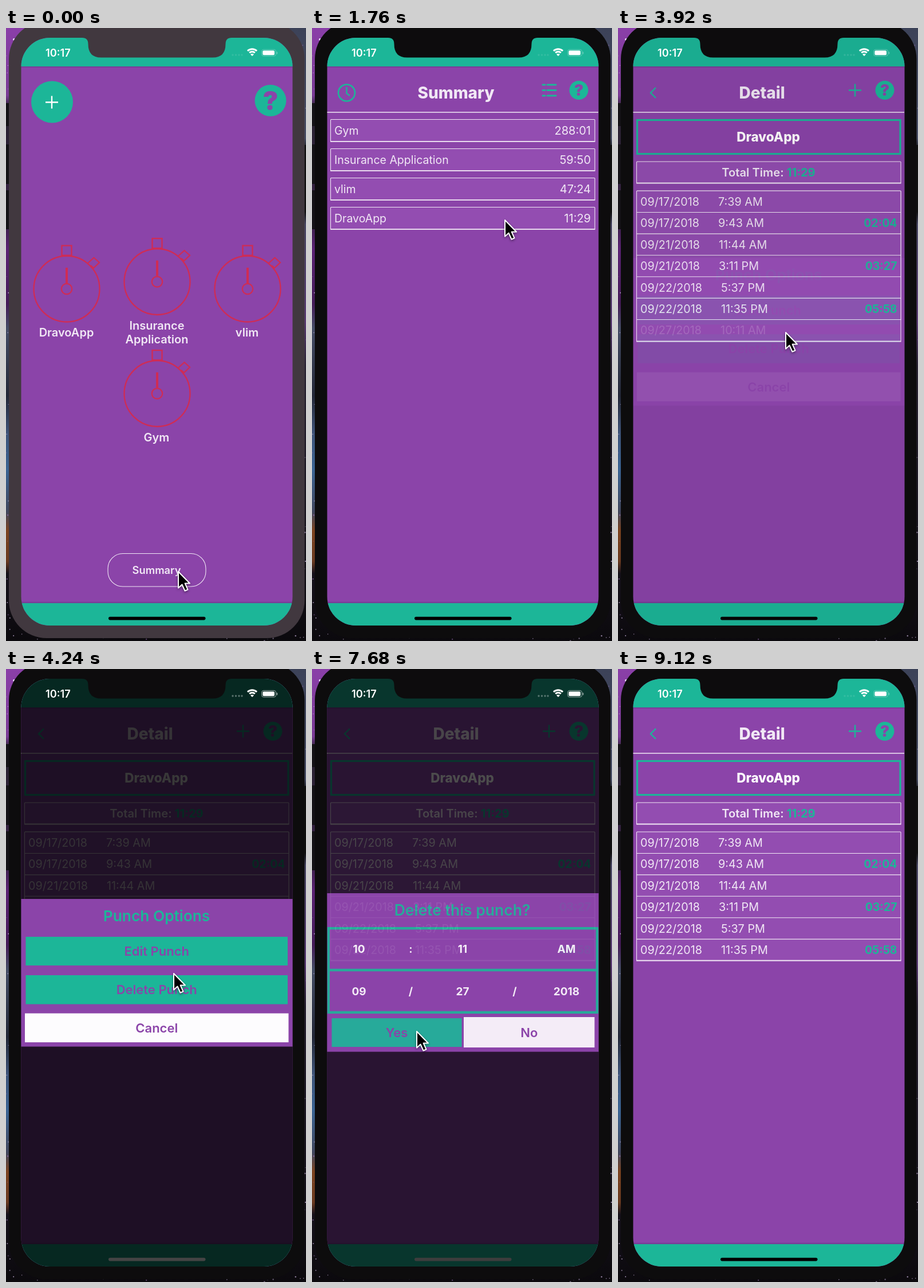
Write an HTML page that moves like this. It is 524x1069 px and loops after 9200 ms.

```html
<!DOCTYPE html>
<html lang="en">
<head>
<meta charset="utf-8">
<title>Time tracker</title>
<style>
  html, body { margin: 0; width: 100%; height: 100%; overflow: hidden; background: #0d0b11; }
  svg { display: block; width: 524px; height: 1069px; }
  text { font-family: Inter, "Open Sans", sans-serif; white-space: pre; }
</style>
</head>
<body>
<svg id="stage" viewBox="0 0 524 1069" xmlns="http://www.w3.org/2000/svg"></svg>
<script>
const LOOP = 9200, STEP = 80;
const PURPLE = '#8b44a9', TEAL = '#1cb698', RED = '#cf2c55', LIGHT = '#f1e8f5';
const TASK = 'DravoApp', SIDE = 'vlim';

// Drawing helpers
const rect = (x, y, x2, y2, fill, more = '') =>
  `<rect x="${x}" y="${y}" width="${x2 - x}" height="${y2 - y}" fill="${fill}" ${more}/>`;
const circle = (x, y, r, fill, more = '') =>
  `<circle cx="${x}" cy="${y}" r="${r}" fill="${fill}" ${more}/>`;
const line = (d, color, width, more = '') =>
  `<path d="${d}" fill="none" stroke="${color}" stroke-width="${width}" ${more}/>`;
const text = (str, x, y, size, weight, fill = LIGHT, anchor = 'middle') =>
  `<text x="${x}" y="${y + size * 0.364}" font-size="${size}" font-weight="${weight}" fill="${fill}" text-anchor="${anchor}">${str}</text>`;
const group = (id, body, more = '') => `<g id="${id}" ${more}>${body}</g>`;
const card = (y, y2) =>
  rect(32.5, y, 494, y2, '#934db1', `stroke="${LIGHT}" stroke-width="1.1" rx="1"`) +
  line(`M32 ${y2}H494.5`, LIGHT, 1.8);
const help = (x, y, r, size) => circle(x, y, r, TEAL) + text('?', x, y, size, 900, PURPLE);
const plus = (x, y, r, color) => line(`M${x - r} ${y}h${2 * r}M${x} ${y - r}v${2 * r}`, color, 2.4);
const header = title =>
  text(title, 251.5, 113, 28, 800, LIGHT) + help(466, 108.5, 16.5, 27) +
  line('M26 147H500', LIGHT, 1.3);

function wallpaper() {
  const bands = [
    [0, '#8a3fa8'], [0.11, '#7a3a95'], [0.13, '#27222e'], [0.32, '#3a2148'], [0.36, '#5b2274'],
    [0.45, '#451b58'], [0.49, '#454d66'], [0.6, '#232737'], [0.66, '#3e5378'], [0.72, '#3a6494'],
    [0.79, '#41465c'], [0.82, '#7c431f'], [0.87, '#6a3a20'], [0.89, '#15111a'], [1, '#0b090d']];
  const rightBands = [[0, '#3c4258'], [0.18, '#4a5068'], [0.2, '#111'], [0.3, '#111'],
    [0.32, '#4b4a66'], [0.48, '#5b3c75'], [0.55, '#2b2535'], [0.8, '#1a1620'], [1, '#0b090d']];
  const gradient = (id, stops) => `<linearGradient id="${id}" x2="0" y2="1">` +
    stops.map(([o, c]) => `<stop offset="${o}" stop-color="${c}"/>`).join('') + '</linearGradient>';
  let seed = 7;
  const rnd = () => (seed = seed * 16807 % 2147483647) / 2147483647;
  let stars = '';
  for (let i = 0; i < 110; i++) {
    const edge = rnd(), bottom = edge > 0.6;
    const x = bottom ? rnd() * 524 : edge > 0.3 ? rnd() * 8 : 516 + rnd() * 8;
    const y = bottom ? 1030 + rnd() * 39 : rnd() * 1069;
    stars += circle(x, y, 0.4 + rnd() * 0.9, rnd() > 0.4 ? '#c9b4dc' : '#8f6aa8', `opacity="${0.3 + rnd() * 0.6}"`);
  }
  return `<defs>${gradient('sky', bands)}${gradient('skyRight', rightBands)}
    <clipPath id="screen"><rect x="26.5" y="17" width="474" height="1025" rx="50"/></clipPath></defs>` +
    rect(0, 0, 262, 1069, 'url(#sky)') + rect(262, 0, 524, 1069, 'url(#skyRight)') +
    stars + circle(14, 20, 2, '#eee0ff') +
    rect(0, 131, 8, 171, '#141216') + rect(0, 203, 8, 272, '#141216') +
    rect(0, 283, 8, 351, '#141216') + rect(518, 204, 524, 318, '#111');
}

function stopwatch(x, y) {
  return `<g transform="translate(${x} ${y})" fill="none" stroke="${RED}" stroke-width="2.3">
    <circle r="57.5"/><circle r="9.2"/><path d="M0 -37V-10" stroke-width="4"/>
    <rect x="-8.5" y="-75.5" width="17" height="17"/>
    <path d="M37 -45L47.500 -54.500L57 -46L47 -36.500L42 -41"/></g>`;
}

function home() {
  const label = (s, x, y) => text(s, x, y, 20, 600);
  return circle(80.5, 129, 36.5, TEAL) + plus(80, 129.5, 11, '#fff') + help(462, 126.5, 27.5, 45) +
    stopwatch(106, 455) + stopwatch(264, 442.5) + stopwatch(422, 455) + stopwatch(264, 637.5) +
    label(TASK, 105.5, 531) + label('Insurance', 263.5, 519) + label('Application', 263.5, 543) +
    label(SIDE, 421, 531) + label('Gym', 263, 713.5) +
    rect(178, 916.5, 349, 974, 'none', `rx="26" stroke="${LIGHT}" stroke-width="1.1"`) +
    text('Summary', 263, 945, 18.3, 600);
}

function summary() {
  const rows = [['Gym', '288:01'], ['Insurance Application', '59:50'], [SIDE, '47:24'], [TASK, '11:29']];
  return header('Summary') +
    circle(60.5, 113, 14.5, 'none', `stroke="${TEAL}" stroke-width="2.6"`) +
    line('M60.500 103V114L66 118', TEAL, 2.4) +
    [99, 108.5, 118].map(y => line(`M403 ${y}h4M411 ${y}h15`, TEAL, 3, 'stroke-linecap="round"')).join('') +
    rows.map(([name, time], i) => {
      const y = 159.5 + i * 51;
      return card(y, y + 38.3) + text(name, 39, y + 19.5, 19.5, 400, LIGHT, 'start') +
        text(time, 487, y + 19.5, 20, 400, LIGHT, 'end');
    }).join('');
}

function detail() {
  const rows = [['17', '7:39 AM'], ['17', '9:43 AM', '02:04'], ['21', '11:44 AM'],
    ['21', '3:11 PM', '03:27'], ['22', '5:37 PM'], ['22', '11:35 PM', '05:58']];
  const rowY = i => 302.8 + i * 37.4;
  const punch = ([day, time, span], i) =>
    text(`09/${day}/2018<tspan dx="33">${time}</tspan>`, 39, rowY(i), 19.8, 400, LIGHT, 'start') +
    (span ? text(span, 487.5, rowY(i), 19.5, 700, TEAL, 'end') : '');
  const rule = i => line(`M33 ${rowY(i) - 18.7}H494`, LIGHT, 1.1);
  return header('Detail') + line('M66 104L57 113L66 122', TEAL, 2.4) + plus(414, 108.5, 11, TEAL) +
    rect(33.5, 160.5, 493, 219.5, PURPLE, `stroke="${TEAL}" stroke-width="3.2"`) +
    text(TASK, 262.5, 190, 22.5, 800, '#fff') +
    card(233, 270.5) +
    text(`Total Time: <tspan fill="${TEAL}" font-weight="700">11:29</tspan>`, 263, 252, 20.2, 600) +
    card(284, 508.5) +
    group('lastRow', card(284, 546.5) + rule(6) + group('lastText', punch(['27', '10:11 AM'], 6))) +
    rows.map((row, i) => punch(row, i) + (i ? rule(i) : '')).join('');
}

const shade = rect(20, 10, 510, 1050, '#000', 'opacity="0.78"');
const button = (label, x, y, x2, y2, fill) =>
  rect(x, y, x2, y2, fill) + text(label, (x + x2) / 2, (y + y2) / 2, 22, 600, PURPLE);

function menu() {
  return shade + rect(26, 401, 501, 658.5, PURPLE) + text('Punch Options', 263, 430, 26.3, 600, TEAL) +
    button('Edit Punch', 34.5, 467, 492, 517, TEAL) +
    button('Delete Punch', 34.5, 534, 492, 584.5, TEAL) +
    button('Cancel', 33, 600.5, 493.5, 651, '#fdfcfe');
}

function confirmBox() {
  const cols = [82, 172.5, 263, 354, 444.5];
  const cells = (list, y) => list.map((s, i) => text(s, cols[i], y, 19, 700, '#fff')).join('');
  return shade + rect(26, 391, 501, 667.5, PURPLE) + text('Delete this punch?', 262.5, 420.5, 26.5, 600, TEAL) +
    rect(28.8, 452.2, 498, 598.8, 'none', `stroke="${TEAL}" stroke-width="4.4"`) +
    line('M28 525H499', TEAL, 4.4) +
    cells(['10', ':', '11', '', 'AM'], 488.5) + cells(['09', '/', '27', '/', '2018'], 562) +
    button('Yes', 34.5, 609, 261.5, 659, TEAL) + button('No', 265, 607, 493.5, 660, '#fff');
}

function status() {
  const arc = (r, w) => {
    const d = r * 0.7;
    return line(`M${430 - d} ${48 - d}A${r} ${r} 0 0 1 ${430 + d} ${48 - d}`, '#fff', w);
  };
  return text('10:17', 69, 43.5, 18.3, 600, '#fff', 'start') +
    group('dots', [396, 401.5, 407, 412].map(x => circle(x, 47, 1.7, '#fff')).join('')) +
    arc(11.5, 3) + arc(6.8, 3) + '<path d="M427 46a4 4 0 0 1 6 0l-3 3z" fill="#fff"/>' +
    group('cell', rect(446.5, 37.5, 471.5, 49, 'none', 'rx="3.5" stroke="#fff"') +
      line('M473.500 41.500v4', '#fff', 1.6)) +
    rect(448.3, 39.2, 469, 47.3, '#fff', 'rx="2"');
}

const stage = document.getElementById('stage');
stage.innerHTML = wallpaper() +
  group('bezel', '<rect x="5" y="-12" width="516.500" height="1076" rx="66"/>') +
  group('view',
    rect(26, 17, 501, 1042, PURPLE) +
    group('home', home()) + group('summary', summary()) + group('detail', detail()) +
    rect(26, 66, 501, 69, '#3a2a5a', 'opacity="0.22"') + rect(26, 1000.5, 501, 1003, '#3a2a5a', 'opacity="0.22"') +
    rect(26, 17, 501, 67, TEAL) + rect(26, 1003, 501, 1042, TEAL) +
    group('menu', menu()) + group('confirm', confirmBox()) +
    group('bar', '<rect x="179" y="1026.800" width="169.500" height="5.600" rx="2.800"/>') +
    status(), 'clip-path="url(#screen)"') +
  group('notch', '<path d="M133 14V17Q143.500 17 143.500 28Q143.500 51.500 166 51.500H361Q383.500 51.500 383.500 28Q383.500 17 394 17V14Z"/>') +
  group('cursor', `<path d="M0 0V28.500L6.500 22.500L11.500 33.500L16.500 31.300L11.700 20.500H20Z"
    fill="#000" stroke="#fff" stroke-width="2" stroke-linejoin="round" style="filter:drop-shadow(0 2px 2px #0006)"/>`);

const part = {};
stage.querySelectorAll('g[id]').forEach(g => part[g.id] = g);

// Cursor stops: time, x, y
const path = [[0, 301, 948], [800, 301, 948], [1600, 337, 335], [2400, 337, 335], [3280, 293, 531],
  [4480, 293, 531], [4960, 287, 556], [5600, 287, 556], [6160, 285, 569], [6480, 285, 569],
  [7280, 183, 632], [8080, 183, 632], [8800, -30, 760], [9200, -30, 760]];

const clamp = v => Math.max(0, Math.min(1, v));
const fade = (t, start, end) => clamp((t - start) / 300) * (1 - clamp((t - end) / 300));
const show = (id, on) => part[id].setAttribute('display', on ? 'inline' : 'none');
const alpha = (id, v) => part[id].setAttribute('opacity', v);

function cursorAt(t) {
  const i = path.findIndex(p => p[0] > t);
  const [t0, x0, y0] = path[i - 1], [t1, x1, y1] = path[i];
  const k = (t - t0) / (t1 - t0), e = k * k * (3 - 2 * k);
  return [x0 + (x1 - x0) * e, y0 + (y1 - y0) * e];
}

function render(t) {
  show('home', t < 640);
  show('summary', t >= 640 && t < 2080);
  show('detail', t >= 2080);
  show('lastRow', t < 7640);
  alpha('lastText', t >= 3720 && t < 4240 ? 0.2 : 1);

  const a = fade(t, 3900, 5200), b = fade(t, 5200, 7650), dim = Math.max(a, b);
  alpha('menu', a);
  alpha('confirm', b);
  alpha('dots', 0.1 + 0.25 * dim);
  alpha('cell', 0.3 + 0.3 * dim);
  const g = Math.round(68 * dim);
  part.bar.setAttribute('fill', `rgb(${g},${g},${g})`);

  const shell = t < 480 ? '#41383f' : '#0d0c0d';
  part.bezel.setAttribute('fill', shell);
  part.notch.setAttribute('fill', shell);
  part.cursor.setAttribute('transform', `translate(${cursorAt(t)})`);
}

const origin = performance.now();
function tick() {
  const t = (performance.now() - origin) % LOOP;
  render(Math.floor(t / STEP) * STEP);
  requestAnimationFrame(tick);
}
tick();
</script>
</body>
</html>
```
